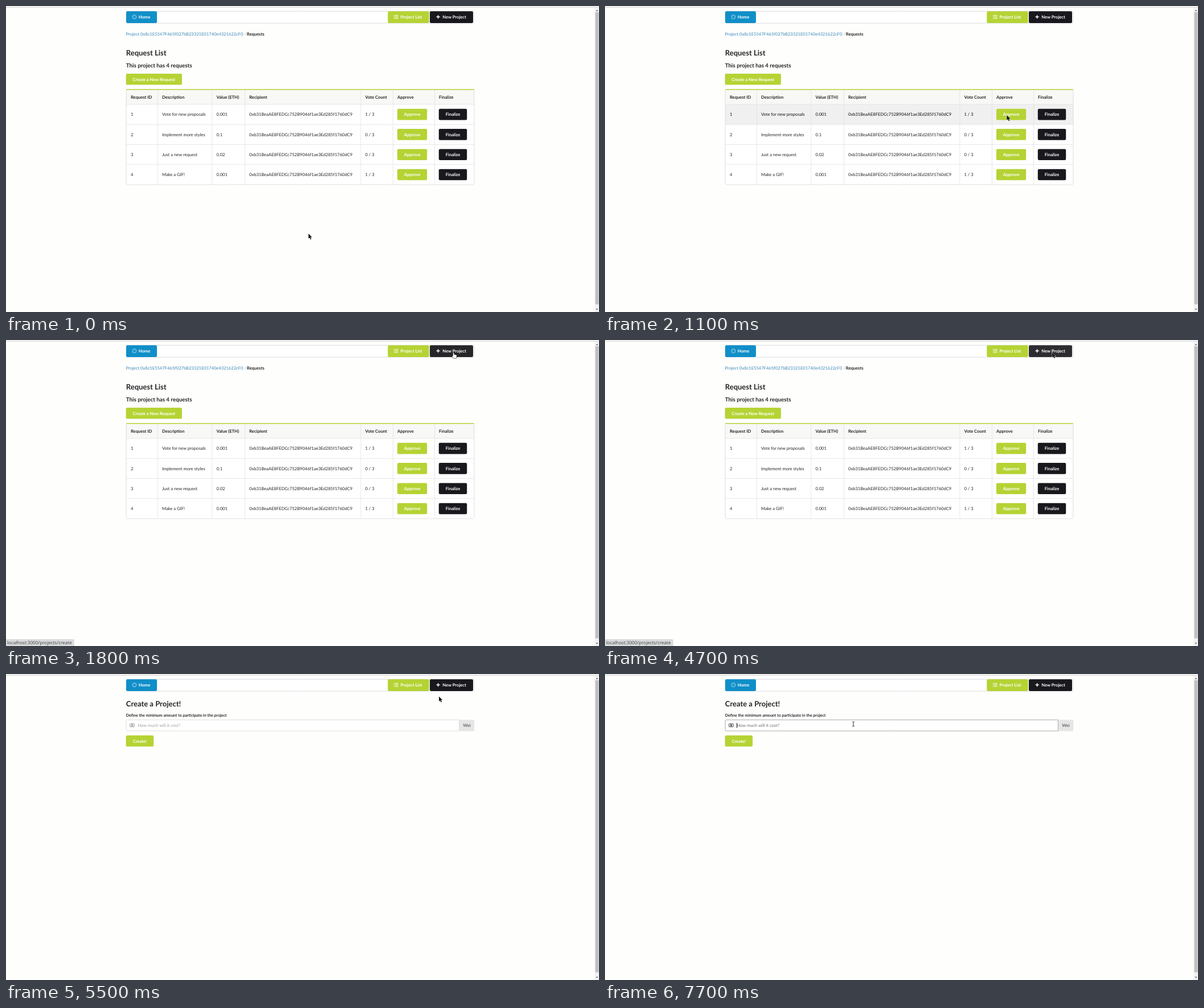
An HTML page with a canvas for the animation above (8 s loop, 1041 by 538 pixels).

```html
<!DOCTYPE html>
<html lang="en">
<head>
<meta charset="utf-8">
<title>Project requests</title>
<style>
html, body { margin: 0; width: 100%; height: 100%; overflow: hidden; background: #fefefd; }
canvas { display: block; width: 1041px; height: 538px; }
</style>
</head>
<body>
<canvas id="stage"></canvas>
<script>
const W = 1041, H = 538, LOOP = 8000;
const ZOOM = W / 1920;
const LEFT = 210.8, RIGHT = 822.2;
const GREEN = '#b5d334', BLACK = '#18181d', BLUE = '#108fc8', INK = '#252525', PAGE = '#fefefd';

const canvas = document.getElementById('stage');
const ctx = canvas.getContext('2d');
const dpr = window.devicePixelRatio || 1;
canvas.width = W * dpr;
canvas.height = H * dpr;

const RECIPIENT = '0xb31BeaAE8FEDCc752B9046f1ae3Ed285f1760dC9';
const PROJECT = 'Project 0x8c1E5547F465f027bB23321E01740e4321622cF0';
const COLS = [219, 274, 369.5, 427, 630.5, 687, 760];
const HEADS = ['Request ID', 'Description', 'Value (ETH)', 'Recipient', 'Vote Count', 'Approve', 'Finalize'];
const ROWS = [
  ['Vote for new proposals', '0.001', '1 / 3'],
  ['Implement more styles', '0.1', '0 / 3'],
  ['Just a new request', '0.02', '0 / 3'],
  ['Make a GIF!', '0.001', '1 / 3']
];
const ROW_TOP = 173, ROW_H = 35.27;

// time, x, y, shape of the pointer
const POINTER = [
  [0, 531, 400.3, arrow], [400, 533.5, 394.3, arrow],
  [600, 600, 335, arrow], [700, 700, 219, arrow], [800, 706, 252, arrow],
  [1000, 706, 222, arrow], [1100, 705.3, 192, arrow], [1200, 755, 88, arrow],
  [1400, 772, 50, arrow], [1500, 783, 26, arrow], [1600, 785, 22, arrow], [1700, 785, 22, hand],
  [4700, 785, 22, arrow], [4900, 784, 23, arrow], [5000, 781, 26, arrow],
  [5100, 775, 31, arrow], [5200, 766, 37, arrow], [5300, 760, 39.5, arrow],
  [5800, 700, 48, arrow], [5900, 580, 64, arrow], [6000, 477, 77, arrow],
  [6200, 478.5, 79, beam], [6400, 436, 88, beam]
];
// time, index of the highlighted row
const HOVER = [[0, -1], [700, 1], [800, 2], [1000, 1], [1100, 0], [1200, -1]];
const NEW_FILL = [[0, BLACK], [1600, '#1d1d21'], [1700, '#222226'], [1800, '#262629'], [4700, '#2d2d31'], [5500, BLACK]];
const STATUS = [[0, false], [1600, true], [5100, false]];
const FOCUS = [[0, 0], [6600, 0.4], [6700, 0.8], [6800, 1]];
const CARET = [[0, false], [6600, true], [7100, false], [7700, true]];

function at(track, t) {
  let found = track[0];
  for (const key of track) if (key[0] <= t) found = key;
  return found;
}

function rect(x, y, w, h, fill) {
  ctx.fillStyle = fill;
  ctx.fillRect(x, y, w, h);
}

function round(x, y, w, h, fill, r = 2.2) {
  ctx.beginPath();
  ctx.roundRect(x, y, w, h, r);
  ctx.fillStyle = fill;
  ctx.fill();
}

function frame(x, y, w, h, stroke, r = 2.2, width = 0.8) {
  ctx.beginPath();
  ctx.roundRect(x, y, w, h, r);
  ctx.strokeStyle = stroke;
  ctx.lineWidth = width;
  ctx.stroke();
}

// cy is the middle of the capital letters, size is in page pixels
function text(str, x, cy, { size = 14, bold = false, fill = INK, align = 'left' } = {}) {
  const px = size * ZOOM;
  ctx.font = `${bold ? 700 : 400} ${px}px Lato, sans-serif`;
  ctx.textAlign = align;
  ctx.fillStyle = fill;
  ctx.fillText(str, x, cy + px * 0.36);
}

function button(label, x, y, w, fill) {
  round(x, y, w, 19.6, fill);
  text(label, x + w / 2, y + 9.8, { bold: true, fill: '#fff', align: 'center' });
}

function triangle(x, y, dir) {
  ctx.beginPath();
  ctx.moveTo(x - 2, y + dir);
  ctx.lineTo(x + 2, y + dir);
  ctx.lineTo(x, y - dir);
  ctx.fill();
}

function chrome() {
  rect(0, 0, W, H, PAGE);
  rect(0, 0, W, 2, '#f3f2f1');
  rect(0, 2, W, 1, '#dcdbda');
  rect(1033.5, 3, 7.5, H - 3, '#f1f1f1');
  rect(1034.5, 11, 6, 513.5, '#c0c0c0');
  ctx.fillStyle = '#505050';
  triangle(1037.4, 8, 1);
  triangle(1037.4, 533.5, -1);
}

function ballIcon(x, y) {
  ctx.strokeStyle = 'rgba(255,255,255,.75)';
  ctx.lineWidth = 0.7;
  ctx.beginPath();
  ctx.arc(x, y, 3.6, 0, Math.PI * 2);
  ctx.stroke();
  ctx.beginPath();
  for (let i = 0; i < 5; i++) {
    const a = i * Math.PI * 0.4 - Math.PI / 2;
    const c = Math.cos(a), s = Math.sin(a);
    ctx.moveTo(x + c * 1.7, y + s * 1.7);
    ctx.lineTo(x + c * 3.4, y + s * 3.4);
  }
  ctx.stroke();
}

function menu(t) {
  round(LEFT, 9, RIGHT - LEFT, 21.3, '#fff');
  frame(LEFT + 0.3, 9.3, RIGHT - LEFT - 0.6, 20.9, '#dcdde3', 2.2, 1);
  round(LEFT + 0.2, 9.2, 54, 20.8, BLUE);
  ballIcon(225.4, 19.2);
  text('Home', 232.8, 19.2, { bold: true, fill: '#fff' });

  round(670.3, 9.2, 72.4, 20.8, GREEN);
  for (let i = 0; i < 3; i++) {
    rect(681, 15.9 + i * 2.6, 1.4, 1.3, '#fff');
    rect(683.2, 16 + i * 2.6, 5.4, 1.1, '#fff');
  }
  text('Project List', 692.4, 19.2, { bold: true, fill: '#fff' });

  round(744, 9.2, 76, 20.8, at(NEW_FILL, t)[1]);
  rect(755.5, 18.4, 6.2, 1.5, '#fff');
  rect(757.85, 16.1, 1.5, 6.1, '#fff');
  text('New Project', 766.2, 19.2, { bold: true, fill: '#fff' });
}

function table(hover) {
  const bottom = ROW_TOP + ROW_H * 4;
  round(LEFT, 146, RIGHT - LEFT, bottom - 146, '#fff');
  rect(LEFT, 147, RIGHT - LEFT, ROW_TOP - 147, '#f8f8f7');
  if (hover >= 0) rect(LEFT, ROW_TOP + ROW_H * hover, RIGHT - LEFT, ROW_H, '#f1f0f0');
  for (let i = 0; i < 4; i++) rect(LEFT, ROW_TOP - 0.4 + ROW_H * i, RIGHT - LEFT, 0.7, '#dfdfdf');
  for (const x of COLS.slice(1)) rect(x - 8, 147, 0.7, bottom - 147, '#dfdfdf');
  frame(LEFT + 0.3, 146.5, RIGHT - LEFT - 0.6, bottom - 146.5, '#d9d9da');
  round(LEFT, 146, RIGHT - LEFT, 1.5, GREEN, [1.5, 1.5, 0, 0]);

  HEADS.forEach((head, i) => text(head, COLS[i], 160.2, { bold: true }));
  ROWS.forEach(([name, value, votes], i) => {
    const cy = ROW_TOP + ROW_H * (i + 0.5);
    const fill = i === hover ? '#0d0d0d' : INK;
    [String(i + 1), name, value, RECIPIENT, votes].forEach((cell, c) => text(cell, COLS[c], cy, { fill }));
    button('Approve', COLS[5], cy - 9.8, 52.2, GREEN);
    button('Finalize', COLS[6] - 0.2, cy - 9.8, 49.4, BLACK);
  });
}

function requestPage(t) {
  text(PROJECT, 210.6, 49.3, { fill: '#3d88b8' });
  text('/', 418.8, 49.3, { fill: '#aaa' });
  text('Requests', 422.8, 49.3, { bold: true });
  text('Request List', 210.8, 82.5, { size: 24, bold: true });
  text('This project has 4 requests', 210.8, 104.5, { size: 18, bold: true });
  button('Create a New Request', 210.6, 119, 98.3, GREEN);
  table(at(HOVER, t)[1]);
}

function statusBar() {
  round(-3, 526, 122.8, 15, '#d9dbdc', 2);
  ctx.font = '8.06px "Open Sans", sans-serif';
  ctx.textAlign = 'left';
  ctx.fillStyle = '#3c3c3c';
  ctx.fillText('localhost:3000/projects/create', 2, 534.8);
}

function moneyIcon(focus) {
  ctx.globalAlpha = 0.55 + 0.45 * focus;
  frame(217.7, 87.6, 7.4, 5.2, '#222', 0.6, 0.9);
  ctx.beginPath();
  ctx.ellipse(221.4, 90.2, 1.3, 1.6, 0, 0, Math.PI * 2);
  ctx.fillStyle = '#222';
  ctx.fill();
  ctx.globalAlpha = 1;
}

function createPage(t) {
  const focus = at(FOCUS, t)[1];
  const grey = (from, to) => {
    const v = Math.round(from + (to - from) * focus);
    return `rgb(${v},${v},${v})`;
  };
  text('Create a Project!', 210.8, 52, { size: 24, bold: true });
  text('Define the minimum amount to participate in the project', 210.8, 72.8, { size: 13, bold: true });
  round(795.4, 80.4, 26.8, 20, '#e6e6e6', [0, 2.2, 2.2, 0]);
  text('Wei', 808.9, 90.3, { bold: true, fill: '#696969', align: 'center' });
  round(LEFT, 80.5, 584.8, 19.8, '#fff', [2.2, 0, 0, 2.2]);
  frame(LEFT + 0.2, 80.7, 584.4, 19.4, grey(214, 150), [2.2, 0, 0, 2.2]);
  moneyIcon(focus);
  text('How much will it cost?', 231.4, 90.3, { fill: grey(160, 112) });
  if (at(CARET, t)[1]) rect(231, 86, 1, 9, '#333');
  button('Create!', 210.6, 108, 48.6, GREEN);
}

function outline(points) {
  ctx.beginPath();
  for (const [x, y] of points) ctx.lineTo(x, y);
  ctx.closePath();
}

function arrow() {
  outline([[0, 0], [0, 8.8], [2, 7], [3.5, 10.3], [5, 9.6], [3.6, 6.5], [6.2, 6.3]]);
  ctx.strokeStyle = 'rgba(255,255,255,.85)';
  ctx.lineWidth = 1;
  ctx.stroke();
  ctx.fillStyle = '#151515';
  ctx.fill();
}

function hand() {
  outline([[-0.2, 0.2], [1.2, 0.2], [1.4, 3.6], [5.6, 4.5], [6.2, 5.5], [5.7, 8], [5, 10],
    [0.8, 10], [-1.8, 6.4], [-1.4, 5.5], [-0.2, 6.4]]);
  ctx.lineJoin = 'round';
  ctx.strokeStyle = '#111';
  ctx.lineWidth = 1.2;
  ctx.stroke();
  ctx.fillStyle = '#fff';
  ctx.fill();
}

function beam() {
  rect(-2.6, -4.6, 5.2, 9.2, 'rgba(255,255,255,.6)');
  rect(-0.5, -4, 1, 8, '#333');
  rect(-2.1, -4.4, 4.2, 0.9, '#444');
  rect(-2.1, 3.5, 4.2, 0.9, '#444');
}

function pointer(t) {
  const [, x, y, shape] = at(POINTER, t);
  ctx.save();
  ctx.translate(x, y);
  shape();
  ctx.restore();
}

function draw(now) {
  const t = now % LOOP;
  ctx.setTransform(dpr, 0, 0, dpr, 0, 0);
  ctx.textBaseline = 'alphabetic';
  ctx.textRendering = 'geometricPrecision';
  chrome();
  menu(t);
  if (t < 5500) requestPage(t);
  else createPage(t);
  if (at(STATUS, t)[1]) statusBar();
  pointer(t);
}

const start = performance.now();
function tick() {
  draw(performance.now() - start);
  requestAnimationFrame(tick);
}
tick();
</script>
</body>
</html>
```
